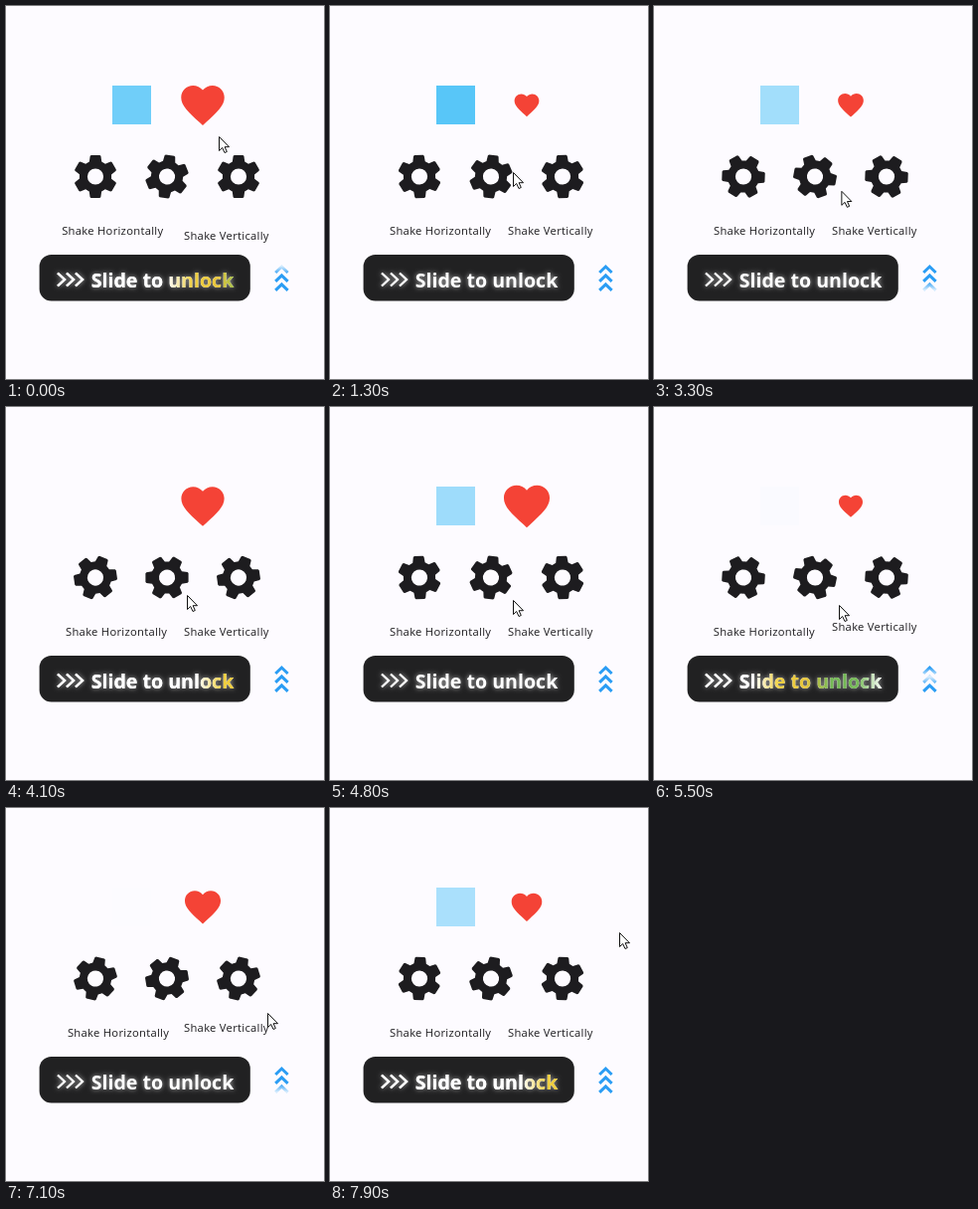
Recreate the animation shown at these times as an HTML page with a canvas. Size 320x375 px, loop 8 s.

```html
<!DOCTYPE html>
<html lang="en">
<head>
<meta charset="utf-8">
<title>Looping effects</title>
<style>
html, body { margin: 0; width: 100%; height: 100%; overflow: hidden; background: #fdfbff; }
canvas { display: block; width: 320px; height: 375px; }
</style>
</head>
<body>
<canvas id="stage"></canvas>
<script>
const W = 320, H = 375, LOOP = 8;
const INK = '#1d1c1f';
const canvas = document.getElementById('stage');
const ctx = canvas.getContext('2d');
const dpr = window.devicePixelRatio || 1;
canvas.width = W * dpr;
canvas.height = H * dpr;

const TAU = Math.PI * 2;
const clamp = v => Math.max(0, Math.min(1, v));
const mod = (a, b) => ((a % b) + b) % b;

// Piecewise path: rows of [time, ...values]
function along(rows, t, ease = u => u) {
  if (t <= rows[0][0]) return rows[0].slice(1);
  for (let i = 1; i < rows.length; i++) {
    const a = rows[i - 1], b = rows[i];
    if (t <= b[0]) {
      const u = ease((t - a[0]) / (b[0] - a[0]));
      return a.slice(1).map((v, k) => v + (b[k + 1] - v) * u);
    }
  }
  return rows[rows.length - 1].slice(1);
}

function at(x, y, draw) {
  ctx.save();
  ctx.translate(x, y);
  draw();
  ctx.restore();
}

function gradient(x0, y0, x1, y1, stops) {
  const g = ctx.createLinearGradient(x0, y0, x1, y1);
  for (const [offset, color] of stops) g.addColorStop(offset, color);
  return g;
}

const heartPath = new Path2D('M12 21.35l-1.45-1.32C5.4 15.36 2 12.28 2 8.5 2 5.42 4.42 3 7.5 3c1.74 0 3.41.81 4.5 2.09C13.09 3.81 14.76 3 16.5 3 19.58 3 22 5.42 22 8.5c0 3.78-3.4 6.86-8.55 11.54z');

function makeGear() {
  const p = new Path2D();
  const half = [[2.75, -6.65], [2.39, -9.19], [1.92, -9.6]];
  const tooth = [...half.map(([x, y]) => [-x, y]), ...half.reverse()];
  for (let i = 0; i < 6; i++) {
    const c = Math.cos(i * TAU / 6), s = Math.sin(i * TAU / 6);
    for (const [x, y] of tooth) p.lineTo(x * c - y * s, x * s + y * c);
  }
  p.closePath();
  p.moveTo(3.6, 0);
  p.arc(0, 0, 3.6, 0, TAU, true);
  return p;
}
const gearPath = makeGear();

function gear(x, degrees) {
  at(x, 171.5, () => {
    ctx.rotate(degrees * Math.PI / 180);
    ctx.scale(2.25, 2.25);
    ctx.fillStyle = INK;
    ctx.fill(gearPath, 'evenodd');
  });
}

function badge(t) {
  const u = mod(t + 0.34, 1.52) / 1.52;
  ctx.globalAlpha = Math.pow((1 + Math.cos(Math.PI * u)) / 2, 1.5);
  ctx.fillStyle = '#54c5f8';
  ctx.fillRect(107, 80, 39, 39);
  ctx.globalAlpha = 1;
}

function heart(t) {
  const width = 38 + 14 * Math.sin(0.4 + 3.06 * t);
  at(198, 99.6, () => {
    ctx.scale(width / 20, width / 20);
    ctx.translate(-12, -12);
    ctx.fillStyle = '#f44336';
    ctx.fill(heartPath);
  });
}

function labels(t) {
  const s = mod(t + 0.25, 1.8);
  const on = s < 0.6;
  const dx = on ? 4 * Math.sin(TAU * 7.15 * s) : 0;
  const dy = on ? 5.5 * Math.sin(TAU * 5 * s) : 0;
  ctx.font = '11.2px "Open Sans", "Noto Sans", sans-serif';
  ctx.letterSpacing = '0.3px';
  ctx.fillStyle = INK;
  ctx.fillText('Shake Horizontally', 60 + dx, 230);
  ctx.fillText('Shake Vertically', 179, 230 + dy);
  ctx.letterSpacing = '0px';
}

function slideContent() {
  ctx.lineWidth = 2.3;
  ctx.lineCap = 'butt';
  ctx.lineJoin = 'miter';
  for (let i = 0; i < 3; i++) {
    const x = 52 + i * 9;
    ctx.beginPath();
    ctx.moveTo(x, 268.5);
    ctx.lineTo(x + 7, 275);
    ctx.lineTo(x, 281.5);
    ctx.stroke();
  }
  ctx.font = '700 19.6px "Open Sans", "Noto Sans", sans-serif';
  ctx.fillText('Slide to unlock', 85.7, 283);
}

const sweepColors = [
  [0, '#fff'], [0.2, '#f0cf3f'], [0.4, '#e8c63c'],
  [0.6, '#74b955'], [0.8, '#74b955'], [1, '#fff']
];

function slider(t) {
  ctx.fillStyle = '#212122';
  ctx.beginPath();
  ctx.roundRect(33.6, 250, 212.2, 46.4, 12);
  ctx.fill();

  ctx.save();
  ctx.fillStyle = ctx.strokeStyle = '#fff';
  ctx.shadowColor = 'rgba(255,255,255,0.65)';
  ctx.shadowBlur = 5 * dpr;
  slideContent();
  ctx.restore();

  // Colour sweep, left to right
  const p = mod(t - 1.4, 1.9);
  if (p > 1) return;
  const [edge] = along([[0, 60], [0.3, 100], [0.5, 162], [0.8, 192], [1, 232]], p);
  ctx.globalAlpha = clamp(p / 0.3);
  ctx.fillStyle = ctx.strokeStyle = gradient(edge, 0, edge + 130, 0, sweepColors);
  slideContent();
  ctx.globalAlpha = 1;
}

function arrows(t) {
  const band = 286 - 50 * mod(t - 1.4, 1.9);
  ctx.strokeStyle = gradient(0, band - 9, 0, band + 9,
    [[0, '#2b9df4'], [0.5, '#dff0fe'], [1, '#2b9df4']]);
  ctx.lineWidth = 3;
  ctx.lineCap = 'butt';
  ctx.lineJoin = 'miter';
  for (let i = 0; i < 3; i++) {
    const y = 262 + i * 8.9;
    ctx.beginPath();
    ctx.moveTo(271.2, y + 6);
    ctx.lineTo(277.4, y);
    ctx.lineTo(283.6, y + 6);
    ctx.stroke();
  }
}

const pointerPath = new Path2D('M0 0V14L3.2 11L5.5 16L7.8 15L5.6 10.2H10Z');
const route = [
  [0, 214, 131], [1.3, 184, 167], [2.4, 196, 182], [4.1, 182, 189],
  [5.5, 186, 199], [7.1, 263, 206], [7.9, 291, 125]
];

function pointer(t) {
  const [x, y] = along(route, t, u => u * u * (3 - 2 * u));
  at(x + 0.5, y + 0.5, () => {
    ctx.fillStyle = '#fff';
    ctx.strokeStyle = '#111';
    ctx.lineWidth = 1;
    ctx.lineJoin = 'miter';
    ctx.fill(pointerPath);
    ctx.stroke(pointerPath);
  });
}

function draw(t) {
  ctx.setTransform(dpr, 0, 0, dpr, 0, 0);
  ctx.fillStyle = '#fdfbff';
  ctx.fillRect(0, 0, W, H);
  badge(t);
  heart(t);
  const spin = 137 * t;
  gear(90, spin);
  gear(162, spin + 8);
  gear(234, spin);
  labels(t);
  slider(t);
  arrows(t);
  pointer(t);
}

const start = performance.now();
function tick() {
  draw(((performance.now() - start) / 1000) % LOOP);
  requestAnimationFrame(tick);
}
tick();
</script>
</body>
</html>
```
